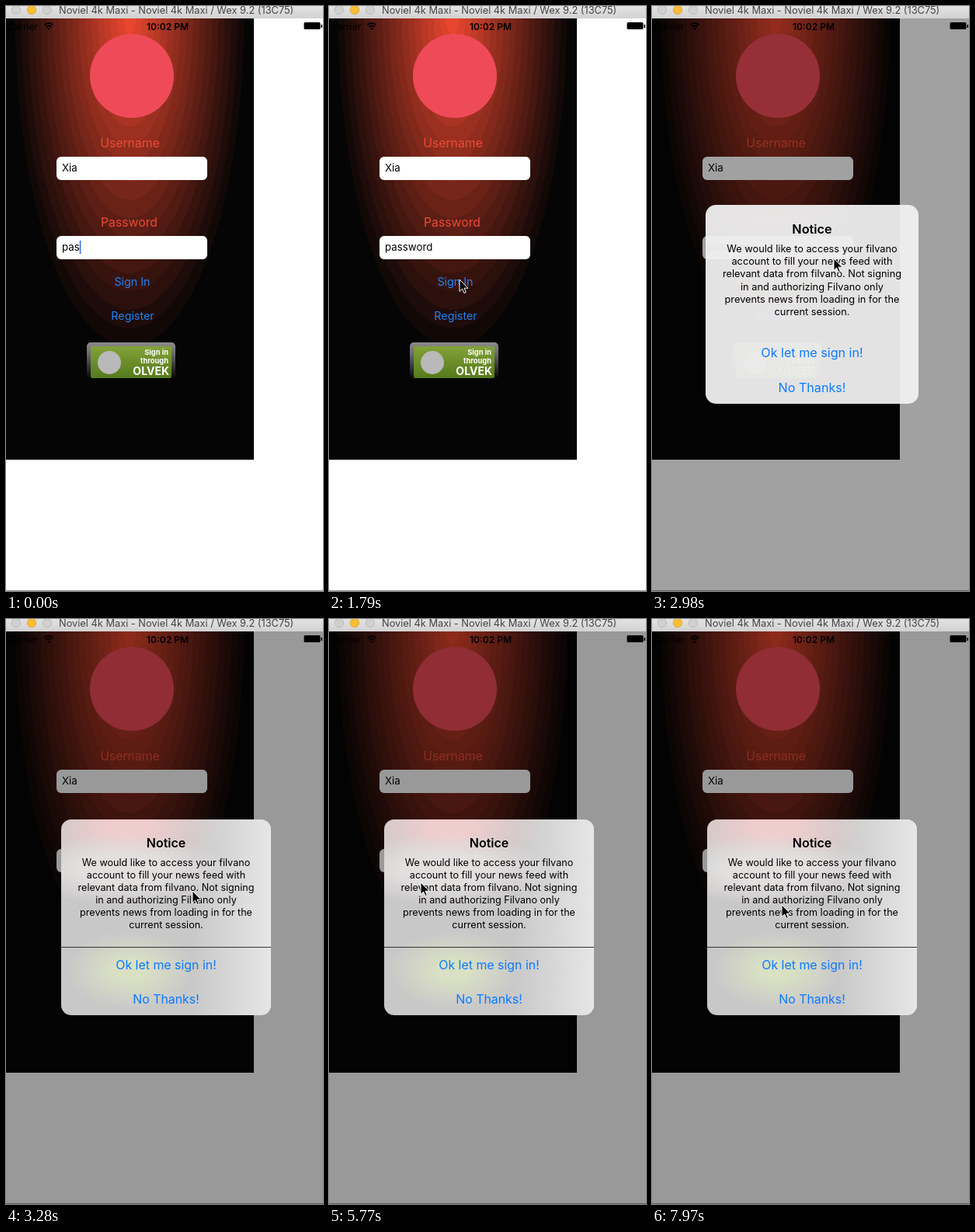
Write an HTML page that moves like this. It is 408 px wide and 753 px high and loops after 8000 ms.

```html
<!DOCTYPE html>
<html lang="en">
<head>
<meta charset="utf-8">
<title>Sign in</title>
<style>
  html, body { margin: 0; width: 100%; height: 100%; overflow: hidden; background: #fff; }
  svg { display: block; font-family: Inter, "Liberation Sans", sans-serif; }
  .mid { text-anchor: middle; }
  .end { text-anchor: end; fill: #fff; font-weight: 700; }
  .label { font-size: 15.8px; fill: #ea4a35; }
  .input { font-size: 13.3px; }
  .link { font-size: 14.3px; fill: #1f83f5; }
  .action { font-size: 15.9px; fill: #0a7aff; }
  .status { font-size: 12px; }
</style>
</head>
<body>
<svg width="408" height="753" viewBox="0 0 408 753">
  <defs>
    <radialGradient id="glow" gradientUnits="userSpaceOnUse" cx="0" cy="0" r="1"
      gradientTransform="translate(159 14) scale(147 424)"></radialGradient>
    <linearGradient id="bar" x2="0" y2="1">
      <stop stop-color="#e2e2e2"/><stop offset="1" stop-color="#d2d2d2"/>
    </linearGradient>
    <linearGradient id="bezel" x2="0" y2="1">
      <stop stop-color="#8c8c8c"/><stop offset=".3" stop-color="#6c6c6c"/><stop offset="1" stop-color="#080808"/>
    </linearGradient>
    <linearGradient id="green" x2="0" y2="1">
      <stop stop-color="#82a238"/><stop offset="1" stop-color="#557a1c"/>
    </linearGradient>
    <linearGradient id="side">
      <stop offset=".62" stop-color="#e6e6e6" stop-opacity="0"/>
      <stop offset="1" stop-color="#e6e6e6"/>
    </linearGradient>
    <radialGradient id="pink">
      <stop offset=".2" stop-color="#f0cdcd"/><stop offset="1" stop-color="#f0cdcd" stop-opacity="0"/>
    </radialGradient>
    <radialGradient id="pale">
      <stop offset=".4" stop-color="#e2e0df"/><stop offset="1" stop-color="#e2e0df" stop-opacity="0"/>
    </radialGradient>
    <radialGradient id="lime">
      <stop offset=".25" stop-color="#d9e0c4"/><stop offset="1" stop-color="#d9e0c4" stop-opacity="0"/>
    </radialGradient>
    <clipPath id="card"><rect x="71" y="258" width="270" height="252" rx="13"/></clipPath>
  </defs>

  <rect width="408" height="753" fill="#fff"/>
  <rect y="752" width="408" height="1" fill="#999"/>
  <rect y="15" width="319" height="569" fill="#050505"/>
  <rect y="15" width="319" height="569" fill="url(#glow)"/>

  <g class="status">
    <text x="2" y="31">Carrier</text>
    <g fill="none" stroke="#000" stroke-width="1.8">
      <path d="M49.5 24.5q5.500-5 11 0M51.800 27q3.200-3 6.400 0"/>
      <circle cx="55" cy="29.200" r=".6"/>
    </g>
    <g id="spinner" stroke="#000" stroke-width="1.300" stroke-linecap="round"></g>
    <text class="mid" x="208" y="31" font-weight="600">10:02 PM</text>
    <path d="M385 21h18q1.500 0 1.500 1.500v6q0 1.500-1.500 1.500h-18q-1.500 0-1.500-1.500v-6q0-1.500 1.500-1.500ZM405.500 24h1.500v4h-1.500Z"/>
  </g>

  <circle cx="162" cy="90" r="54" fill="#ef4a58"/>

  <text class="label mid" x="159.500" y="182">Username</text>
  <rect x="65" y="194" width="194" height="30" rx="6" fill="#fff"/>
  <text class="input" x="72" y="213">Xia</text>
  <text class="label mid" x="158.500" y="284">Password</text>
  <rect x="65" y="296" width="194" height="30" rx="6" fill="#fff"/>
  <text class="input" id="typed" x="72" y="315"></text>
  <rect id="caret" y="302" width="1.600" height="17" fill="#3b6fe0"/>
  <text class="link mid" x="162.500" y="360">Sign In</text>
  <text class="link mid" x="163" y="404">Register</text>

  <rect x="104" y="433" width="114" height="46" rx="5" fill="url(#bezel)"/>
  <rect x="109" y="438" width="104" height="41" rx="2" fill="url(#green)"/>
  <circle cx="133" cy="459" r="15" fill="#b9b9b9"/>
  <text class="end" x="209" y="449" font-size="9.300">Sign in</text>
  <text class="end" x="209" y="460" font-size="9.300">through</text>
  <text class="end" x="210" y="475" font-size="14">OLVEK</text>

  <rect id="dim" y="16" width="408" height="737"/>

  <g id="alert">
    <rect id="haze" x="71" y="258" width="270" height="252" rx="13" fill="#f2f2f2" opacity=".94"/>
    <g id="glass" clip-path="url(#card)">
      <rect x="71" y="258" width="270" height="252" fill="#c9c8c8"/>
      <ellipse cx="158" cy="268" rx="120" ry="58" fill="url(#pink)"/>
      <ellipse cx="150" cy="322" rx="140" ry="46" fill="url(#pale)"/>
      <ellipse cx="160" cy="452" rx="82" ry="50" fill="url(#lime)"/>
      <rect x="71" y="258" width="270" height="252" fill="url(#side)"/>
      <rect x="71" y="422" width="270" height="1" fill="#333"/>
    </g>
    <text class="mid" x="206" y="294" font-size="16" font-weight="600">Notice</text>
    <g class="mid" id="message" font-size="12.600"></g>
    <text class="action mid" x="206" y="451">Ok let me sign in!</text>
    <text class="action mid" x="206" y="495">No Thanks!</text>
  </g>

  <rect width="408" height="16" fill="url(#bar)"/>
  <g stroke-width=".8">
    <circle cx="13" cy="5" r="5.700" fill="#d0d0d0" stroke="#b5b5b5"/>
    <circle cx="33" cy="5" r="5.700" fill="#fbbd35" stroke="#dea02f"/>
    <circle cx="53" cy="5" r="5.700" fill="#d0d0d0" stroke="#b5b5b5"/>
  </g>
  <text x="68" y="10" font-size="12.800" fill="#444">Noviel 4k Maxi - Noviel 4k Maxi / Wex 9.2 (13C75)</text>

  <path id="pointer" d="M0 0V15.500L3.600 12 6 17.500 8.300 16.500 6 11.200H11Z" fill="#000" stroke="#fff" stroke-width="1"/>
</svg>
<script>
const $ = id => document.getElementById(id);
const show = (id, on) => $(id).setAttribute('visibility', on ? 'visible' : 'hidden');

function add(parent, name, attrs, text = '') {
  const node = document.createElementNS('http://www.w3.org/2000/svg', name);
  for (const key in attrs) node.setAttribute(key, attrs[key]);
  node.textContent = text;
  $(parent).append(node);
}

// Banded red glow that ends in a visible dark rim
const bands = 18;
for (let i = 0; i < bands; i++) {
  const k = 1 - i / bands;
  const color = `rgb(${[227, 65, 41].map(c => Math.round(5 + c * k))})`;
  for (const edge of [i, i + 1]) add('glow', 'stop', { offset: edge / bands, 'stop-color': color });
}
add('glow', 'stop', { offset: 1, 'stop-color': '#050505' });

for (let i = 0; i < 8; i++) {
  add('spinner', 'path', { d: 'M72.500 23.500V21.500', transform: `rotate(${i * 45} 72.500 26)`, opacity: 0.3 + i * 0.1 });
}

[
  'We would like to access your filvano',
  'account to fill your news feed with',
  'relevant data from filvano. Not signing',
  'in and authorizing Filvano only',
  'prevents news from loading in for the',
  'current session.'
].forEach((line, i) => add('message', 'text', { x: 206, y: 318 + 16 * i }, line));

const LOOP = 8000, ALERT = 2970, SETTLED = 3115;
const keyTimes = [140, 285, 440, 735, 885];

// Pointer tip: time, x, y
const path = [
  [1340, 142, 334], [1490, 156, 362], [1790, 168, 352], [1940, 168, 352], [2240, 238, 358],
  [2540, 250, 350], [2830, 248, 344], [2980, 234, 325], [3280, 240, 350], [3430, 247, 385],
  [3720, 232, 464], [4010, 172, 445], [4300, 139, 375], [4455, 152, 308], [4600, 172, 319],
  [4895, 245, 316], [5185, 286, 322], [5480, 190, 336], [5770, 118, 339],
  [6060, 200, 334], [6350, 290, 333], [6640, 170, 352], [6790, 103, 360], [6940, 131, 360],
  [7230, 235, 349], [7375, 294, 350], [7525, 210, 362], [7670, 129, 370], [7820, 129, 370], [7965, 167, 368]
];

const anchors = [0, 2390, 4750, 7080, 9440];
function tick(t) {
  const i = anchors.findLastIndex(a => a <= t + 9);
  const step = (anchors[i + 1] - anchors[i]) / 16;
  return anchors[i] + Math.floor((t + 9 - anchors[i]) / step) * step;
}

function pointAt(t) {
  const i = path.findIndex(p => p[0] > t);
  if (i < 0) return path.at(-1).slice(1);
  if (i === 0) return path[0].slice(1);
  const [a, b] = [path[i - 1], path[i]];
  const k = (t - a[0]) / (b[0] - a[0]);
  return [1, 2].map(n => Math.round(a[n] + (b[n] - a[n]) * k));
}

function draw(time) {
  const t = tick(time % LOOP);

  $('typed').textContent = 'password'.slice(0, 3 + keyTimes.filter(k => t >= k).length);
  $('caret').setAttribute('x', 72 + $('typed').getComputedTextLength());
  show('caret', t < 1490 || (t > 2080 && t < ALERT));
  show('spinner', t > 2230 && t < ALERT);
  $('spinner').setAttribute('transform', `rotate(${Math.round(t / 147) * 45} 72.500 26)`);

  const open = t >= ALERT, settled = t >= SETTLED;
  $('dim').setAttribute('opacity', settled ? 0.4 : open ? 0.37 : 0);
  show('alert', open);
  show('haze', open && !settled);
  show('glass', settled);
  $('alert').setAttribute('transform', `translate(206 384) scale(${settled ? 1 : 1.015}) translate(-206 -384)`);

  show('pointer', t >= 1335);
  $('pointer').setAttribute('transform', `translate(${pointAt(t)})`);
}

function loop() {
  draw(performance.now());
  requestAnimationFrame(loop);
}
loop();
</script>
</body>
</html>
```
